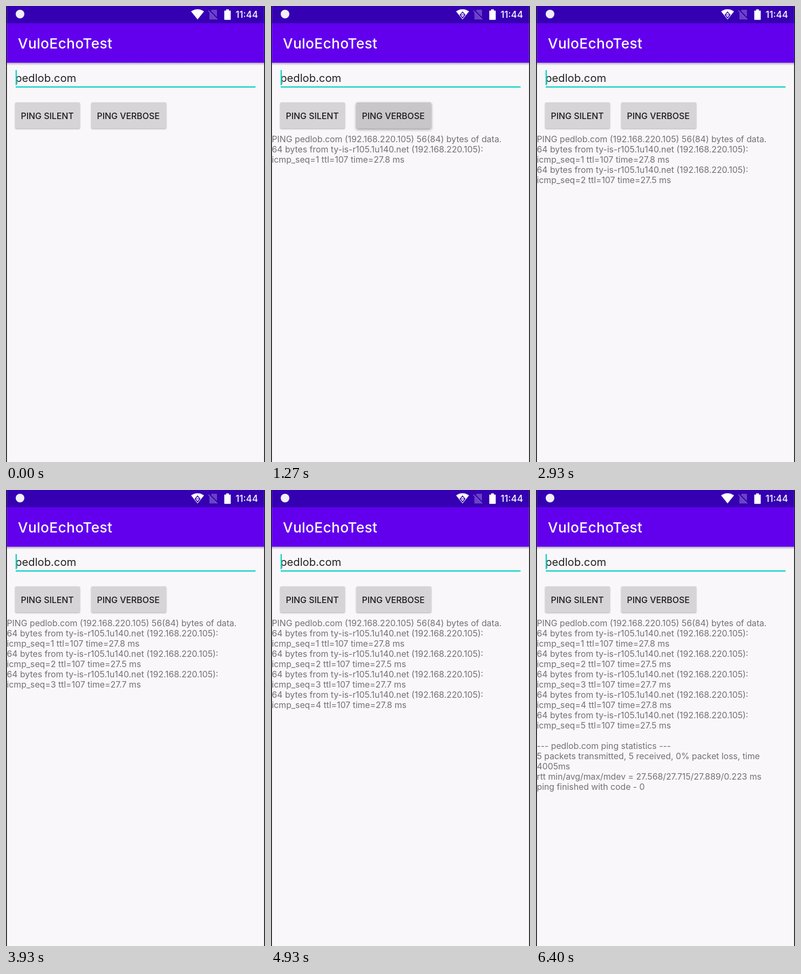
Recreate the animation shown at these times as an HTML page. Size 480x847 px, loop 6.87 s.

```html
<!DOCTYPE html>
<html lang="en">
<head>
<meta charset="utf-8">
<title>Ping demo</title>
<style>
  html, body { margin: 0; width: 100%; height: 100%; overflow: hidden; background: #000; }
  svg { display: block; width: 100%; height: 100%; }
  text { font-family: Inter, Roboto, sans-serif; white-space: pre; }
  .medium { font-weight: 500; }
  .button { fill: #d6d4d6; filter: drop-shadow(0 1px 1.2px rgba(0, 0, 0, .3)); }
  #title { font-size: 26.2px; letter-spacing: .4px; }
  #log { font-size: 15.8px; fill: #737173; }
</style>
</head>
<body>
<svg viewBox="0 0 480 847">
  <defs>
    <linearGradient id="shade" x2="0" y2="1">
      <stop stop-color="#000" stop-opacity=".26"/>
      <stop offset="1" stop-color="#000" stop-opacity="0"/>
    </linearGradient>
    <clipPath id="verboseClip"><rect x="158" y="179" width="139" height="48.5" rx="2.5"/></clipPath>
  </defs>

  <rect x="1.5" width="477" height="847" fill="#f9f7f9"/>
  <rect x="1.5" y="105.5" width="477" height="5" fill="url(#shade)"/>
  <rect x="1.5" y="32" width="477" height="73.5" fill="#6200ee"/>
  <rect x="1.5" width="477" height="32" fill="#3500b2"/>

  <!-- status bar -->
  <circle cx="26" cy="15" r="8" fill="#f3eefb"/>
  <path d="M355 25.1L343 10.1C343.5 9.8 348.1 6 355 6S366.5 9.8 367 10.1Z" fill="#fff"/>
  <g id="traffic">
    <path d="M355 10L360.5 16.5L355 23.5L349.5 16.5Z" fill="#3500b2"/>
    <path d="M355 12.6L358.2 16H351.8ZM351.8 17H358.2L355 20.4Z" fill="#fff"/>
  </g>
  <path d="M381.5 7H390Q391 7 391 8V25H377V11.5Z" fill="#6a42c6"/>
  <path d="M376 7.5L393 24.5" stroke="#3500b2" stroke-width="3"/>
  <path d="M375 8.5L391.5 25" stroke="#7a55cd" stroke-width="1.6"/>
  <path d="M408 6.2H413V8.4H415.5Q416.5 8.4 416.5 9.4V24.7Q416.5 25.7 415.5 25.7H405.5Q404.5 25.7 404.5 24.7V9.4Q404.5 8.4 405.5 8.4H408Z" fill="#fff"/>
  <text class="medium" x="425.5" y="22.4" font-size="17" fill="#fff">11:44</text>

  <text class="medium" id="title" x="22" y="79.3" fill="#fff">VuloEchoTest</text>

  <!-- address field -->
  <text x="17.2" y="141" font-size="20.2" fill="#232223">pedlob.com</text>
  <rect x="18" y="149.2" width="444.5" height="2.4" fill="#12d3c6"/>
  <rect id="cursor" x="17.7" y="119" width="2.4" height="28" fill="#12d3c6"/>

  <rect class="button" x="17" y="179" width="120" height="48.5" rx="2.5"/>
  <rect class="button" id="verbose" x="158" y="179" width="139" height="48.5" rx="2.5"/>
  <circle id="ripple" cx="227.5" cy="203" clip-path="url(#verboseClip)"/>
  <g class="medium" font-size="15.9" fill="#1c1b1c">
    <text x="27.5" y="209.8">PING SILENT</text>
    <text x="168.5" y="209.8">PING VERBOSE</text>
  </g>

  <g id="log"></g>
</svg>
<script>
const LOOP = 6870, PRESS = 1000, RIPPLE = 400;
const host = 'pedlob.com', ip = '192.168.220.105';
const $ = id => document.getElementById(id);
const log = [];
const add = (at, ...lines) => lines.forEach(line => log.push({ at, line }));

add(1200, `PING ${host} (${ip}) 56(84) bytes of data.`);
[27.8, 27.5, 27.7, 27.8, 27.5].forEach((ms, i) => add(1200 + i * 1000,
  `64 bytes from ty-is-r105.1u140.net (${ip}):`,
  `icmp_seq=${i + 1} ttl=107 time=${ms} ms`));
add(5200, '', `--- ${host} ping statistics ---`,
  '5 packets transmitted, 5 received, 0% packet loss, time', '4005ms',
  'rtt min/avg/max/mdev = 27.568/27.715/27.889/0.223 ms',
  'ping finished with code - 0');

for (const [i, entry] of log.entries()) {
  const node = document.createElementNS('http://www.w3.org/2000/svg', 'text');
  node.setAttribute('x', 1.5);
  node.setAttribute('y', 252.5 + i * 19);
  node.textContent = entry.line;
  $('log').append(node);
  entry.node = node;
}

const show = (node, on) => node.setAttribute('visibility', on ? 'visible' : 'hidden');

function cursorOn(t) {
  if (t < 400 || t >= 5930) return true;
  if (t < 930 || t >= 5400) return false;
  return (t - 930) % 1000 < 540;
}

function draw(t) {
  show($('cursor'), cursorOn(t));
  show($('traffic'), t >= 1200 && t < 6400);
  for (const { at, node } of log) show(node, t >= at);

  // the ripple advances in coarse steps
  const p = (Math.floor((t - PRESS) / 67) + 1) * 67 / RIPPLE;
  const pressed = p > 0 && p <= 1.05;
  show($('ripple'), pressed);
  $('ripple').setAttribute('r', pressed ? 75 * Math.sqrt(Math.min(1, p * 1.5)) : 0);
  $('ripple').setAttribute('opacity', pressed ? .13 * Math.min(1, Math.max(0, 2.2 - 2 * p)) : 0);
  $('verbose').style.filter = pressed ? 'drop-shadow(0 2px 2.5px rgba(0, 0, 0, .4))' : '';
}

const start = performance.now();
function tick() {
  draw((performance.now() - start) % LOOP);
  requestAnimationFrame(tick);
}
tick();
</script>
</body>
</html>
```
